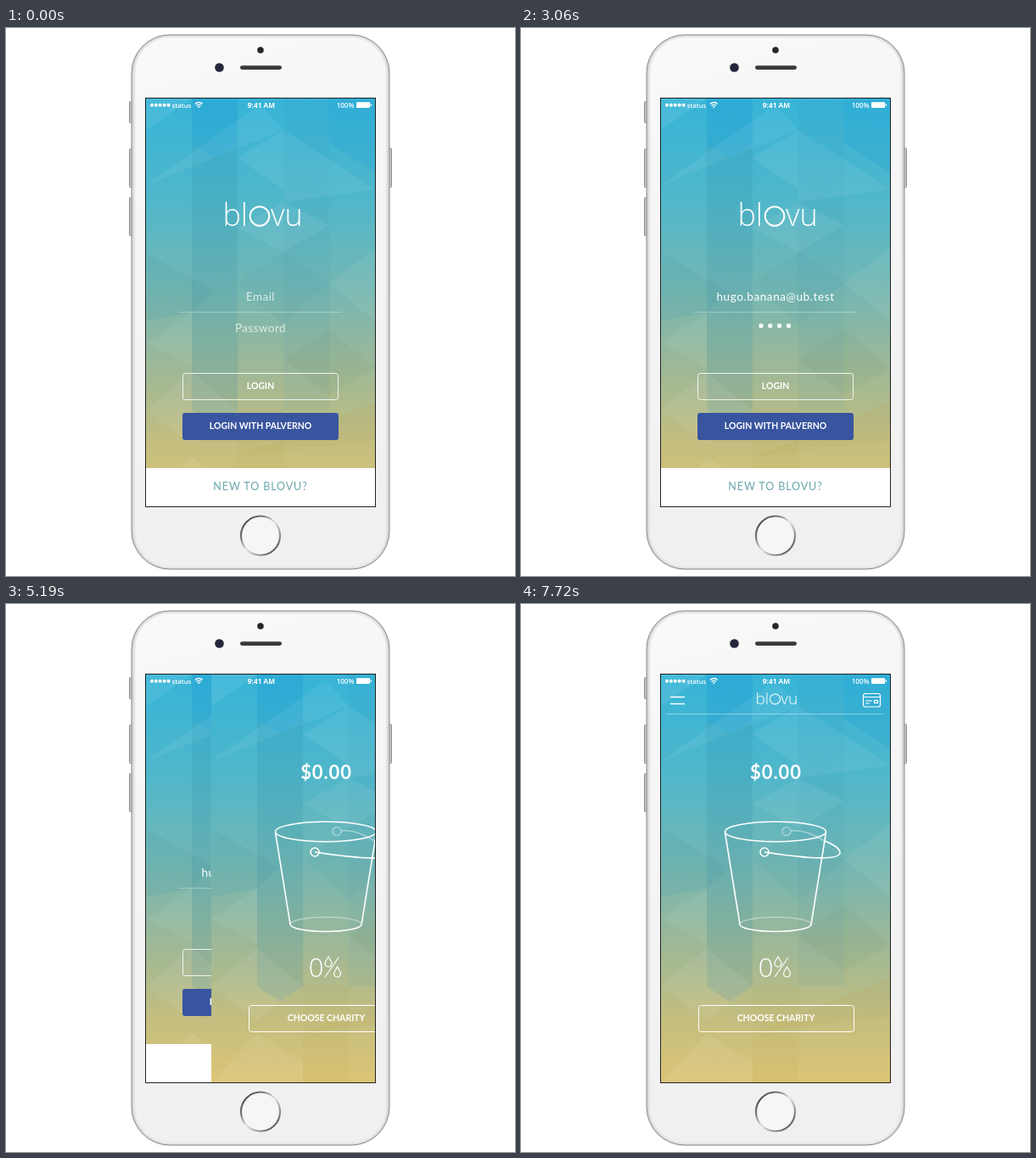
Recreate the animation shown at these times as an HTML page. Size 600 by 645 pixels, loop 8000 ms.

```html
<!DOCTYPE html>
<html lang="en">
<head>
<meta charset="utf-8">
<title>App login</title>
<style>
  html, body { margin: 0; width: 100%; height: 100%; overflow: hidden; background: #fff; }
  svg { display: block; width: 100%; height: 100%; }
  text { font-family: Lato, sans-serif; fill: #fff; text-anchor: middle; }
  .field { font-size: 13.5px; letter-spacing: .6px; }
  .hint { opacity: .75; letter-spacing: .4px; }
  .button { font-size: 10.5px; font-weight: 700; }
  .status text { font: 600 8px "Open Sans", sans-serif; }
  .logo text, .zero { font-family: "Open Sans", sans-serif; font-weight: 300; }
  .logo text { font-size: 36px; }
  .line { fill: none; stroke: #fff; }
</style>
</head>
<body>
<svg viewBox="0 0 600 645">
  <defs>
    <linearGradient id="sky" x2="0" y2="1">
      <stop offset="0" stop-color="#36b4d8"/>
      <stop offset=".25" stop-color="#50b7ca"/>
      <stop offset=".46" stop-color="#73b7b3"/>
      <stop offset=".67" stop-color="#9fb896"/>
      <stop offset=".84" stop-color="#c3be80"/>
      <stop offset="1" stop-color="#dcc474"/>
    </linearGradient>
    <linearGradient id="face" x2=".15" y2="1">
      <stop offset="0" stop-color="#f9f9f9"/>
      <stop offset="1" stop-color="#f0f0f0"/>
    </linearGradient>
    <linearGradient id="ring" x2="1" y2="1">
      <stop offset="0" stop-color="#333"/>
      <stop offset=".28" stop-color="#777"/>
      <stop offset=".5" stop-color="#e4e4e4"/>
      <stop offset=".72" stop-color="#999"/>
      <stop offset="1" stop-color="#333"/>
    </linearGradient>
    <clipPath id="screen"><rect x="165" y="83" width="270" height="480"/></clipPath>
    <g id="backdrop">
      <rect x="165" y="83" width="270" height="480" fill="url(#sky)"/>
      <g id="facets"></g>
    </g>
    <g id="logo" class="logo">
      <text x="285" y="233" style="text-anchor:end">bl</text>
      <circle class="line" cx="299" cy="221.5" r="11.3" stroke-width="2"/>
      <text x="312" y="233" style="text-anchor:start">vu</text>
    </g>
    <path id="drop" class="line" d="M0-6C1.5-3 4-.5 4 2A4 4 0 0 1-4 2C-4-.5-1.5-3 0-6Z" stroke-width="1.2"/>
  </defs>

  <!-- Phone -->
  <g fill="#c9c9c9" stroke="#8d8d8d">
    <rect x="145.5" y="86.5" width="5" height="25" rx="1"/>
    <rect x="145.5" y="142.5" width="5" height="45" rx="1"/>
    <rect x="145.5" y="199.5" width="5" height="45" rx="1"/>
    <rect x="449.5" y="141.5" width="5" height="46" rx="1"/>
    <rect x="148" y="8" width="304" height="629" rx="45" fill="#d3d3d3"/>
    <rect x="151.5" y="10.5" width="297" height="624" rx="42" fill="url(#face)" stroke="#e9e9e9" stroke-width="2"/>
  </g>
  <circle cx="300" cy="26" r="3.8" fill="#2b2626"/>
  <circle cx="251.5" cy="46.5" r="5.3" fill="#25263d"/>
  <rect x="276" y="44.3" width="49" height="4.6" rx="2.3" fill="#3c3939"/>
  <circle cx="300" cy="597.5" r="23" fill="#f6f6f6" stroke="url(#ring)" stroke-width="2.2"/>
  <rect x="164" y="82" width="272" height="482" fill="#222"/>

  <g clip-path="url(#screen)">
    <!-- Login -->
    <use href="#backdrop"/>
    <use href="#logo"/>
    <text id="email" class="field" x="300" y="321"></text>
    <path class="line" d="M204 334.5H396" opacity=".3"/>
    <text id="password" class="field hint" x="300" y="358">Password</text>
    <g id="dots" fill="#fff" opacity=".9"></g>
    <rect class="line" x="208.5" y="406.5" width="183" height="31" rx="3" opacity=".85"/>
    <text class="button" x="300" y="425">LOGIN</text>
    <rect x="208" y="453" width="184" height="32" rx="3" fill="#3a559f"/>
    <text class="button" x="300" y="472">LOGIN WITH PALVERNO</text>
    <rect x="165" y="518" width="270" height="45" fill="#fff"/>
    <text x="300" y="544" style="font-size:12.5px;letter-spacing:.9px;fill:#6ba5aa">NEW TO BLOVU?</text>

    <!-- Bucket -->
    <g id="panel">
      <use href="#backdrop"/>
      <text x="300.5" y="206" style="font-size:22px;font-weight:700;letter-spacing:.9px">$0.00</text>
      <g class="line" stroke-width="1.6">
        <ellipse cx="300" cy="268" rx="59.5" ry="11.7"/>
        <path d="M240.5 269L258 377A42 8.5 0 0 0 342 377L359.5 269"/>
        <circle cx="287" cy="292" r="5"/>
        <path d="M287 292C320 297 371 304 376 293.5C377 288 367 282 357 278.5"/>
        <g opacity=".4">
          <path d="M258 377A42 8.5 0 0 1 342 377M318 267Q336 265 357 278.5"/>
          <circle cx="313" cy="267.5" r="5"/>
        </g>
      </g>
      <text class="zero" x="288.5" y="439" style="font-size:31px">0</text>
      <use href="#drop" x="303" y="421"/>
      <use href="#drop" x="313.5" y="433"/>
      <path class="line" d="M299 439L315 416" stroke-width="1.2"/>
      <rect class="line" x="209.5" y="472.5" width="183" height="31" rx="3"/>
      <text class="button" x="300.5" y="491">CHOOSE CHARITY</text>
      <g id="header">
        <path class="line" d="M172 129.5H428" opacity=".4"/>
        <path class="line" d="M176 109.5H193M176 117.5H193" stroke-width="1.3"/>
        <use href="#logo" transform="translate(141 -5.5) scale(.53)"/>
        <g class="line" stroke-width="1.2">
          <rect x="403.5" y="105.5" width="20" height="15.5" rx="2.5"/>
          <path d="M403.5 109.5H423.5M406 114H414M406 117H411"/>
          <rect x="416.5" y="113.5" width="4" height="3"/>
        </g>
      </g>
    </g>

    <!-- Status bar -->
    <g class="status" fill="#fff">
      <g id="signal"></g>
      <text x="207" y="93.5" style="font-size:7.5px">status</text>
      <path class="line" d="M222.8 89.5Q227.3 85.5 231.8 89.5M224.6 91.5Q227.3 89.2 230 91.5" stroke-width="1.3"/>
      <circle cx="227.3" cy="93" r="1.1"/>
      <text x="301" y="93.8" style="font-weight:700;font-size:8.3px">9:41 AM</text>
      <text x="400" y="93.5">100%</text>
      <rect x="413" y="87.3" width="16" height="6.6" rx="1"/>
      <rect x="429.7" y="89.2" width="1.3" height="2.8"/>
    </g>
    <circle id="tap" fill="#fff" fill-opacity=".14" stroke="#fff" stroke-opacity=".7"/>
  </g>
</svg>
<script>
const DURATION = 8000;
const ADDRESS = 'hugo.banana@ub.test';
const el = id => document.getElementById(id);
const clamp = (v, min = 0, max = 1) => Math.min(max, Math.max(min, v));

const facets = [
  ['219,83 273,83 273,137 246,153 219,137', '#0d8fcf', .25],
  ['219,137 246,153 273,137 273,450 246,468 219,450', '#2a86a4', .16],
  ['327,83 381,83 381,450 327,450', '#2a86a4', .07],
  ['381,83 435,83 435,170 381,135', '#0d8fcf', .15],
  ['165,83 219,83 165,120', '#ffffff', .08],
  ['165,185 300,90 327,120', '#ffffff', .06],
  ['273,153 327,120 327,190', '#ffffff', .07],
  ['327,120 435,190 327,205', '#ffffff', .06],
  ['168,266 245,310 219,335 165,345', '#2a7f98', .09],
  ['273,235 327,264 381,232 327,205', '#ffffff', .06],
  ['273,300 327,264 381,300 327,350', '#2a7f98', .06],
  ['381,300 435,260 435,345', '#ffffff', .06],
  ['165,370 219,335 219,400', '#ffffff', .06],
  ['327,390 381,355 435,400 381,432', '#57854f', .07],
  ['165,450 219,405 273,450 219,490', '#ffffff', .06],
  ['273,505 435,440 435,485', '#a68f35', .08],
  ['165,563 219,505 273,540 273,563', '#ffffff', .07],
  ['273,450 327,450 327,563 273,563', '#a68f35', .06],
];
el('facets').innerHTML = facets.map(([points, fill, alpha]) =>
  `<polygon points="${points}" fill="${fill}" fill-opacity="${alpha}"/>`).join('');

const dotRow = (count, x, y, step, r) => Array.from({ length: count }, (_, i) =>
  `<circle cx="${x + i * step}" cy="${y}" r="${r}"/>`).join('');
el('signal').innerHTML = dotRow(5, 172, 90.7, 4.9, 2);

const taps = [
  { start: 640, end: 1050, x: 257, y: 338.5, r: 19 },
  { start: 2560, end: 2900, x: 238, y: 366, r: 19 },
  { start: 4030, end: 4760, x: 342, y: 415, r: 21.5 },
  { start: 7060, end: 7720, x: 342, y: 485, r: 21.5 },
];

function drawTap(t) {
  const tap = taps.find(({ start, end }) => t >= start && t < end);
  el('tap').setAttribute('opacity', 0);
  if (!tap) return;
  const p = (t - tap.start) / (tap.end - tap.start);
  el('tap').setAttribute('cx', tap.x);
  el('tap').setAttribute('cy', tap.y);
  el('tap').setAttribute('r', tap.r - 3.5 * p);
  el('tap').setAttribute('opacity', Math.min(1, p * 5, (1 - p) * 2));
}

function drawFields(t) {
  const typed = t < 1550
    ? clamp(Math.floor((t - 950) / 45), 0, 11)
    : 12 + Math.floor((t - 1550) / 87);
  el('email').textContent = typed ? ADDRESS.slice(0, typed) : 'Email';
  el('email').classList.toggle('hint', !typed);

  const dots = clamp(Math.floor((t - 2800) / 60), 0, 6);
  el('password').style.display = dots ? 'none' : '';
  el('dots').innerHTML = dotRow(dots, 299.2 - (dots - 1) * 5.4, 350.5, 10.8, 2.7);
}

function draw(t) {
  drawFields(t);
  drawTap(t);
  // Critically damped spring
  const s = Math.max(0, t - 4987) * .0123;
  el('panel').setAttribute('transform', `translate(${270 * (1 + s) * Math.exp(-s)})`);
  el('header').setAttribute('opacity', clamp((t - 5800) / 490));
}

function tick() {
  draw(performance.now() % DURATION);
  requestAnimationFrame(tick);
}
tick();
</script>
</body>
</html>
```
